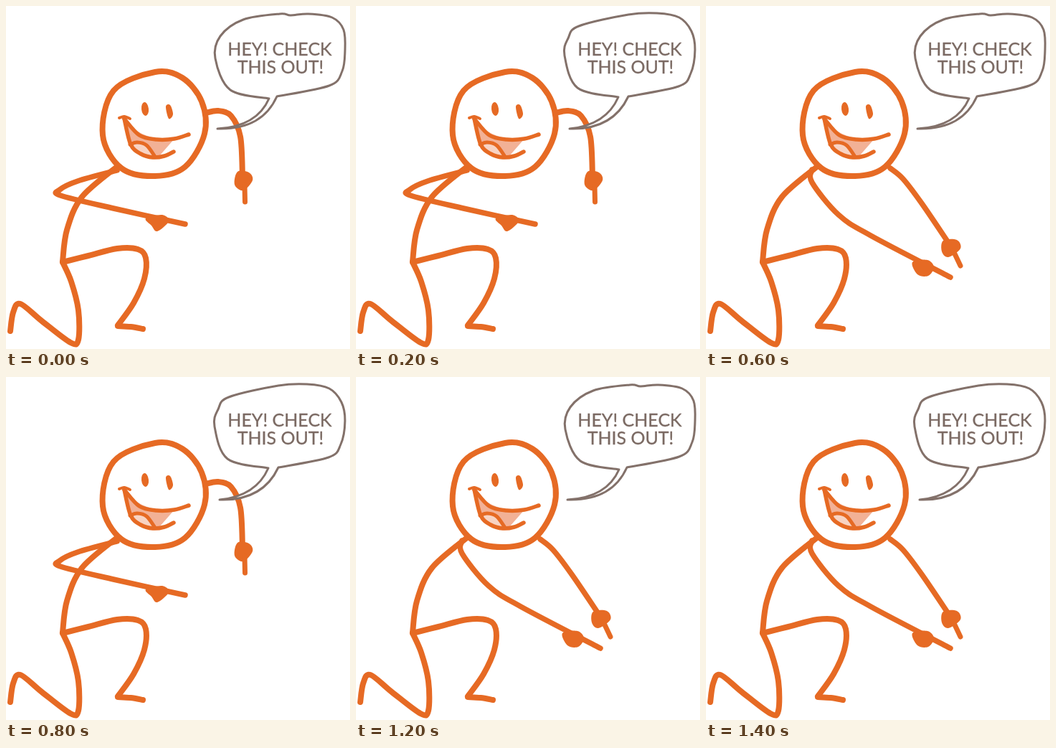
Recreate the animation shown at these times as an HTML page. Size 480x478 px, loop 1600 ms.

```html
<!DOCTYPE html>
<html lang="en">
<head>
<meta charset="utf-8">
<title>Check this out</title>
<style>
  html, body { margin: 0; width: 100%; height: 100%; overflow: hidden; background: #fff; }
  svg { display: block; width: 100%; height: 100%; }
  .ink { fill: none; stroke: #e66a24; stroke-linecap: round; stroke-linejoin: round; }
  .blob { fill: #e66a24; }
  .bubble { fill: #fff; stroke: #83716a; stroke-width: 3; stroke-linejoin: round; }
  text { font: 25px Lato, "Open Sans", sans-serif; fill: #7b6a63; stroke: #7b6a63; stroke-width: .3; text-anchor: middle; }
</style>
</head>
<body>
<svg viewBox="0 0 480 478">
  <g id="body"></g>
  <g id="poses"></g>
  <g id="face"></g>
  <g id="bubbles"></g>
  <text x="382" y="68.5">HEY! CHECK</text>
  <text x="383" y="94">THIS OUT!</text>
</svg>
<script>
const STEP = 200;
const $ = id => document.getElementById(id);

// Smooth curve through a flat list of x, y pairs
function curve(list, closed) {
  const p = [];
  for (let i = 0; i < list.length; i += 2) p.push([list[i], list[i + 1]]);
  const n = p.length, last = closed ? n : n - 1;
  const at = i => closed ? p[(i + n) % n] : p[Math.max(0, Math.min(n - 1, i))];
  let d = `M${p[0]}`;
  for (let i = 0; i < last; i++) {
    const [a, b, c, e] = [at(i - 1), at(i), at(i + 1), at(i + 2)];
    d += `C${[0, 1].map(k => b[k] + (c[k] - a[k]) / 6)} ` +
         `${[0, 1].map(k => c[k] - (e[k] - b[k]) / 6)} ${c}`;
  }
  return d + (closed ? 'Z' : '');
}

const line = (width, list, closed) =>
  `<path class="ink" stroke-width="${width}" d="${curve(list, closed)}"/>`;
const blob = list => `<path class="blob" d="${curve(list, true)}"/>`;
const fill = (color, d) => `<path fill="${color}" d="${d}"/>`;

// Balloon: rim clockwise between the tail's roots, then out to the tip and back
function bubble(rim, tip, outBend, backBend) {
  const d = `${curve(rim)}Q${outBend} ${tip}Q${backBend} ${rim.slice(0, 2)}Z`;
  return `<path class="bubble" d="${d}"/>`;
}

$('body').innerHTML =
  line(8, [156, 223, 106, 266, 85, 312, 79, 356]) +
  line(8, [79, 357, 115, 348, 155, 338, 184, 339, 195, 351, 193, 380, 178, 414, 156, 445]) +
  line(8, [156, 446, 174, 447, 191, 450]) +
  line(8, [79, 357, 91, 384, 101, 424, 101, 465, 90, 469, 50, 439, 20, 415, 10, 427, 6, 453]);

const upPose =
  line(8, [279, 149, 296, 146, 314, 153, 327, 182, 330, 237]) +
  blob([323, 231, 339, 232, 344, 243, 331, 257, 319, 249]) +
  line(7, [333, 250, 333.5, 273]) +
  line(7.5, [155, 229, 100, 244, 75, 256, 76, 264, 150, 282, 250, 304]) +
  blob([195, 296, 218, 291, 227, 300, 211, 314, 203, 306]);

const downPose =
  line(7.5, [257, 226, 275, 241, 301, 275, 337, 328]) +
  blob([331, 327, 350, 326, 355, 338, 338, 350, 329, 342]) +
  line(7, [345, 341, 355, 362]) +
  line(7.5, [148, 228, 148, 246, 185, 291, 230, 320, 341, 378]) +
  blob([288, 357, 309, 354, 318, 364, 310, 376, 295, 374]);

$('poses').innerHTML = `<g>${upPose}</g><g>${downPose}</g>`;

const head = [208, 92, 246, 100, 273, 133, 277, 178, 250, 224, 208, 237, 161, 226, 135, 180, 150, 118];
const upper = [165, 157, 186, 180, 210, 186, 235, 185, 255, 179];
const lower = [165, 157, 174, 193, 188, 206, 205, 211, 221, 209, 234, 203];
const tongue = [173, 193, 183, 190, 196, 194, 208, 210];

$('face').innerHTML =
  fill('#fff', curve(head, true)) + line(8, head, true) +
  fill('#f2b196', curve(lower.slice(0, 8)) + 'L214 209L235 185' +
    'Q188 189 165 157Z') +
  fill('#f8d3c3', curve(tongue) + 'L188 206Z') +
  line(5, tongue) + line(5.5, lower) + line(5.5, upper) +
  line(4, [158, 156, 165, 154, 173, 157]) +
  '<ellipse class="blob" cx="194" cy="143.5" rx="5" ry="9.5" transform="rotate(-6 194 143.5)"/>' +
  blob([223, 140, 229, 138, 233, 151, 227, 157]);

$('bubbles').innerHTML =
  bubble([367, 129, 313, 117, 292, 73, 299, 42, 331, 19, 382, 11, 397, 13, 422, 11, 455, 16,
    471, 33, 473, 63, 469, 91, 451, 111, 378, 126], [295, 171], [357, 173], [350, 168]) +
  bubble([366, 127, 309, 114, 291, 69, 296, 45, 311, 28, 380, 12, 420, 10, 451, 16,
    468, 35, 473, 61, 467, 94, 450, 112, 380, 126], [298, 171], [358, 173], [349, 166]) +
  bubble([364, 129, 327, 124, 302, 109, 290, 67, 298, 42, 318, 24, 382, 9, 428, 11, 455, 21,
    475, 65, 471, 88, 455, 112, 373, 128], [300, 172], [352, 174], [344, 167]);

function show(id, index) {
  [...$(id).children].forEach((el, i) => el.style.display = i === index ? '' : 'none');
}

function draw(time) {
  const step = Math.floor(time / STEP) % 8;
  show('poses', (step >> 1) % 2);
  show('bubbles', step % 3);
}

const start = performance.now();
function tick() {
  draw(performance.now() - start);
  requestAnimationFrame(tick);
}
tick();
</script>
</body>
</html>
```
